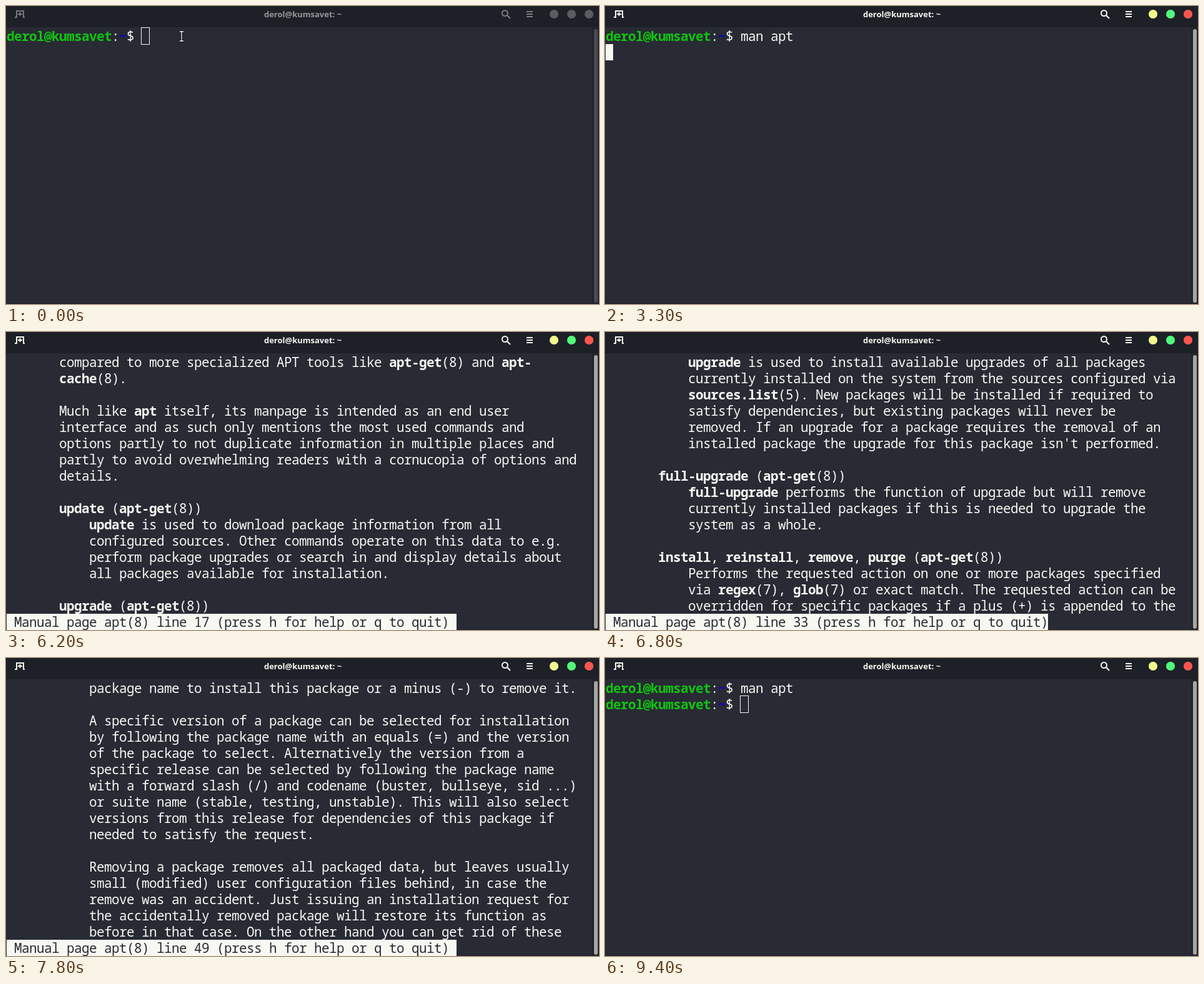
Recreate the animation shown at these times as an HTML page. Size 949 by 477 pixels, loop 9500 ms.

```html
<!DOCTYPE html>
<html lang="en">
<head>
<meta charset="utf-8">
<title>Terminal</title>
<style>
  html, body { margin: 0; width: 100%; height: 100%; overflow: hidden; background: #282a34; }
  #stage { position: relative; width: 949px; height: 477px; overflow: hidden; color: #f8f8f2; }
  #stage > * { position: absolute; }
  #bar { left: 0; top: 0; width: 949px; height: 34px; background: #1d2027; }
  #title { left: 375px; top: 0; width: 200px; text-align: center;
    font: bold 13px/26px "Open Sans", "Noto Sans", sans-serif; }
  #track { left: 938px; top: 34px; width: 11px; height: 443px; background: #22242c; }
  #thumb { left: 941px; top: 37px; width: 6px; height: 438px; border-radius: 3px; background: #a5a6a8; }
  #edge { left: 0; top: 476px; width: 949px; height: 1px; background: #1d2027; }
  #text { left: 1px; top: 35px; margin: 0;
    font: 21px/26px "Noto Sans Mono", monospace; letter-spacing: -.6px; }
  u { text-decoration-thickness: 1px; text-underline-offset: 2px; }
  .user { color: #10c410; }
  .path { color: #0000e4; }
  #status { left: 1px; top: 451px; height: 26px; background: #f8f8f2; color: #282a34;
    white-space: pre; font: 21px/26px "Noto Sans Mono", monospace; letter-spacing: -.6px; }
  #cursor { width: 12px; height: 26px; background: #f8f8f2; }
  #cursor.hollow { background: none; outline: 1px solid #f8f8f2; }
  svg { left: 0; top: 0; fill: none; }
</style>
</head>
<body>
<div id="stage">
  <div id="bar"></div>
  <div id="title">derol@kumsavet: ~</div>
  <div id="track"></div>
  <div id="thumb"></div>
  <div id="edge"></div>
  <pre id="text"></pre>
  <div id="status"></div>
  <div id="cursor"></div>
  <svg width="949" height="477">
    <g id="icons" stroke="#f8f8f2" stroke-width="2">
      <path d="M14 18h3V8h11v10h2M19 13h7M22.5 10v6"/>
      <circle cx="798.5" cy="11.5" r="4.5"/>
      <path d="M802 15l5 5M833 9h10M833 13h10M833 17h10"/>
    </g>
    <g fill="#5b5c61">
      <circle cx="877" cy="13" r="7"/><circle cx="905" cy="13" r="7"/><circle cx="933" cy="13" r="7"/>
    </g>
    <g id="buttons">
      <circle cx="877" cy="13" r="7" fill="#f1fa8c"/>
      <circle cx="905" cy="13" r="7" fill="#50fa7b"/>
      <circle cx="933" cy="13" r="7" fill="#ff5550"/>
    </g>
    <g id="mouse">
      <path id="beam" d="M-3-7.5h2.5L0-7L.5-7.5H3M0-7V7M-3 7.5h2.5L0 7L.5 7.5H3" stroke="#111" stroke-width="3.4"/>
      <use href="#beam" style="stroke:#fff"/>
      <path d="M-3-7.5h2.5L0-7L.5-7.5H3M0-7V7M-3 7.5h2.5L0 7L.5 7.5H3" stroke="#fff" stroke-width="1.3"/>
    </g>
  </svg>
</div>
<script>
const LOOP = 9500;
const PROMPT = '<b class="user">derol@kumsavet</b>:<b class="path">~</b>$ ';
const PROMPT_COLS = 18;
const COMMAND = 'man apt';
const KEYS = [1300, 1500, 1700, 2000, 2400, 2600, 3000];
const ENTER = 3300, QUIT = 8300, BLUR = 9400;
const PAGE_TIMES = [3400, 5400, 6500, 7300];
const CURSOR_OFF = [[900, 1300], [3700, 4500], [4800, 5400], [5900, 6200],
  [6800, 7100], [7500, 7800], [8100, 8300], [8700, 9000]];

// Each page holds the 16 rows above the status line.
const PAGES = [
`APT(8)                               APT                              APT(8)

<b>NAME</b>
       apt - command-line interface

<b>SYNOPSIS</b>
       <b>apt</b> [<b>-h</b>] [<b>-o=</b><u>config_string</u>] [<b>-c=</b><u>config_file</u>] [<b>-t=</b><u>target_release</u>]
           [<b>-a=</b><u>architecture</u>] {list | search | show | update |
           install <u>pkg</u> [{=<u>pkg_version_number</u> | /<u>target_release</u>}]...  |
           remove <u>pkg</u>...  | upgrade | full-upgrade | edit-sources |
           {-v | --version} | {-h | --help}}

<b>DESCRIPTION</b>
       <b>apt</b> provides a high-level commandline interface for the package
       management system. It is intended as an end user interface and
       enables some options better suited for interactive usage by default`,
`       compared to more specialized APT tools like <b>apt-get</b>(8) and <b>apt-</b>
       <b>cache</b>(8).

       Much like <b>apt</b> itself, its manpage is intended as an end user
       interface and as such only mentions the most used commands and
       options partly to not duplicate information in multiple places and
       partly to avoid overwhelming readers with a cornucopia of options and
       details.

       <b>update</b> (<b>apt-get</b>(8))
           <b>update</b> is used to download package information from all
           configured sources. Other commands operate on this data to e.g.
           perform package upgrades or search in and display details about
           all packages available for installation.

       <b>upgrade</b> (<b>apt-get</b>(8))`,
`           <b>upgrade</b> is used to install available upgrades of all packages
           currently installed on the system from the sources configured via
           <b>sources.list</b>(5). New packages will be installed if required to
           satisfy dependencies, but existing packages will never be
           removed. If an upgrade for a package requires the removal of an
           installed package the upgrade for this package isn't performed.

       <b>full-upgrade</b> (<b>apt-get</b>(8))
           <b>full-upgrade</b> performs the function of upgrade but will remove
           currently installed packages if this is needed to upgrade the
           system as a whole.

       <b>install</b>, <b>reinstall</b>, <b>remove</b>, <b>purge</b> (<b>apt-get</b>(8))
           Performs the requested action on one or more packages specified
           via <b>regex</b>(7), <b>glob</b>(7) or exact match. The requested action can be
           overridden for specific packages if a plus (+) is appended to the`,
`           package name to install this package or a minus (-) to remove it.

           A specific version of a package can be selected for installation
           by following the package name with an equals (=) and the version
           of the package to select. Alternatively the version from a
           specific release can be selected by following the package name
           with a forward slash (/) and codename (buster, bullseye, sid ...)
           or suite name (stable, testing, unstable). This will also select
           versions from this release for dependencies of this package if
           needed to satisfy the request.

           Removing a package removes all packaged data, but leaves usually
           small (modified) user configuration files behind, in case the
           remove was an accident. Just issuing an installation request for
           the accidentally removed package will restore its function as
           before in that case. On the other hand you can get rid of these`
];

const el = id => document.getElementById(id);
const clamp = v => Math.max(0, Math.min(1, v));
const passed = (times, t) => times.filter(x => t >= x).length;

function screen(t) {
  const page = passed(PAGE_TIMES, t) - 1;
  if (page >= 0 && t < QUIT) {
    const status = ` Manual page apt(8) line ${1 + 16 * page} (press h for help or q to quit)`;
    return { text: PAGES[page], status, col: status.length, row: 16 };
  }
  if (t >= QUIT) return { text: PROMPT + COMMAND + '\n' + PROMPT, status: '', col: PROMPT_COLS, row: 1 };
  const typed = COMMAND.slice(0, passed(KEYS, t));
  const entered = t >= ENTER;
  return { text: PROMPT + typed, status: '', col: entered ? 0 : PROMPT_COLS + typed.length, row: +entered };
}

function pointer(t) {
  if (t < KEYS[0]) return [281, 48.5];
  const sweep = (from, to, k) => from.map((v, i) => v + (to[i] - v) * k);
  if (t >= 4600 && t < 5400) return sweep([281, 48.5], [333, 160], clamp((t - 4600) / 400));
  if (t >= 8800 && t < BLUR) return sweep([333, 160], [139, 10], clamp((t - 8800) / 500));
  return null;
}

let shown = '';
function draw(now) {
  const t = Math.floor(now % LOOP / 100) * 100;
  const { text, status, col, row } = screen(t);
  if (text + status !== shown) {
    shown = text + status;
    el('text').innerHTML = text;
    el('status').textContent = status;
  }

  const cursor = el('cursor');
  cursor.style.left = 1 + 12 * col + 'px';
  cursor.style.top = 35 + 26 * row + 'px';
  cursor.className = t < 300 || t >= BLUR ? 'hollow' : '';
  cursor.hidden = CURSOR_OFF.some(([a, b]) => t >= a && t < b);

  const focus = clamp((t - 200) / 400);
  const fade = (id, low) => el(id).style.opacity = low + (1 - low) * focus;
  fade('title', .55);
  fade('icons', .42);
  fade('thumb', .3);
  fade('buttons', 0);

  const at = pointer(t);
  el('mouse').style.display = at ? '' : 'none';
  if (at) el('mouse').setAttribute('transform', `translate(${at})`);
  requestAnimationFrame(draw);
}
requestAnimationFrame(draw);
</script>
</body>
</html>
```
